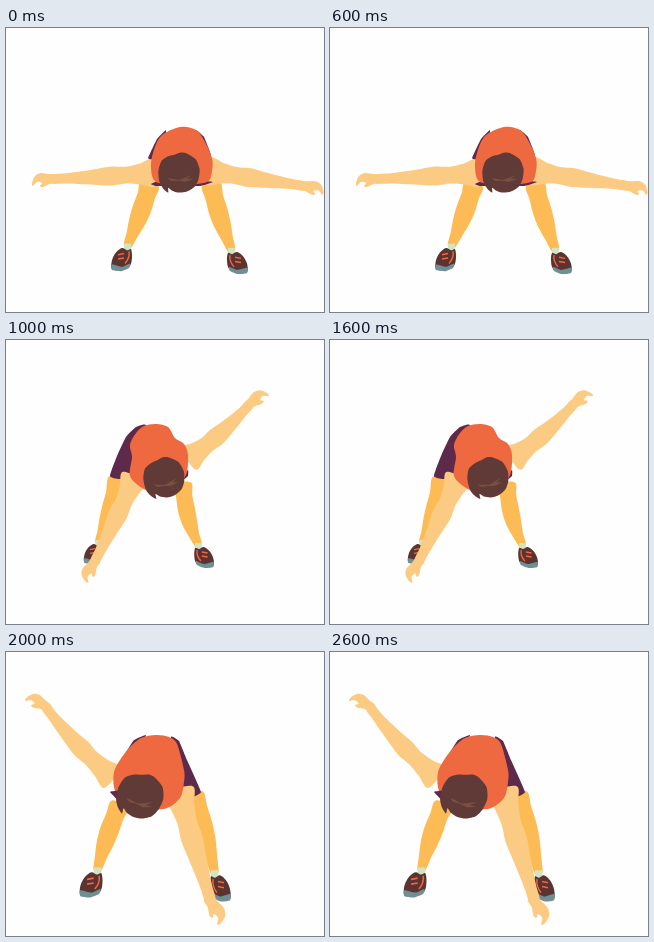
These frames come from a looping animation (318 px wide and 284 px high, 3000 ms). An HTML page with a canvas:

```html
<!DOCTYPE html>
<html lang="en">
<head>
<meta charset="utf-8">
<title>Windmill toe touch</title>
<style>
  html, body { margin: 0; width: 100%; height: 100%; overflow: hidden; background: #fefefe; }
  canvas { display: block; width: 318px; height: 284px; }
</style>
</head>
<body>
<canvas id="stage" width="318" height="284"></canvas>
<script>
const ctx = document.getElementById('stage').getContext('2d');
const POSE_MS = 1000;
const SKIN = '#fbcb83', LEG = '#fdbb55', SHIRT = '#ee6940', SHORTS = '#5d2a4c',
      HAIR = '#5f3a36', STREAK = '#785040', SHOE = '#5b3331', SOLE = '#6e8f93', SOCK = '#d3e5c0';

// Half widths from the body outwards, evenly spaced along the limb.
const ARM_SHAPE = [13, 10.5, 8.5, 9.5, 8, 6.5, 5.2, 4.2];
const LEG_SHAPE = [9, 9, 9.5, 8.5, 6, 3.5];

const parse = text => text.split(' ').map(p => p.split(',').map(Number));

// Closed curve through every point; a low tension keeps corners sharp.
function blob(color, pts, tension = 0.15) {
  if (typeof pts === 'string') pts = parse(pts);
  const n = pts.length, at = i => pts[(i + n) % n];
  ctx.beginPath();
  ctx.moveTo(...pts[0]);
  for (let i = 0; i < n; i++) {
    const [a, b, c, d] = [at(i - 1), at(i), at(i + 1), at(i + 2)];
    ctx.bezierCurveTo(
      b[0] + (c[0] - a[0]) * tension, b[1] + (c[1] - a[1]) * tension,
      c[0] - (d[0] - b[0]) * tension, c[1] - (d[1] - b[1]) * tension, c[0], c[1]);
  }
  ctx.fillStyle = color;
  ctx.fill();
}

function placed(x, y, angle, sx, sy, paint) {
  ctx.save();
  ctx.translate(x, y);
  ctx.rotate(angle);
  ctx.scale(sx, sy);
  paint();
  ctx.restore();
}

// Tapered limb around a quadratic curve from a to c, bent towards b.
function limb(color, shape, path, size) {
  const [a, b, c] = parse(path);
  const left = [], right = [];
  shape.forEach((half, i) => {
    const t = i / (shape.length - 1), u = 1 - t;
    const [x, y] = [0, 1].map(k => u * u * a[k] + 2 * u * t * b[k] + t * t * c[k]);
    const [dx, dy] = [0, 1].map(k => u * (b[k] - a[k]) + t * (c[k] - b[k]));
    const r = half * size / Math.hypot(dx, dy);
    left.push([x + dy * r, y - dx * r]);
    right.unshift([x - dy * r, y + dx * r]);
  });
  blob(color, [...left, ...right]);
  return c;
}

function arm(path, handAngle, side, size = 1) {
  const [x, y] = limb(SKIN, ARM_SHAPE, path, size);
  placed(x, y, handAngle, size, side * size, () =>
    blob(SKIN, '-5,-4 3,-5 11,-6 17,-3 20,4 19,7 15,3 10,4 12,7 9,8 2,5 -5,4'));
}

function leg(path, size, shoeX, shoeY) {
  const [x, y] = limb(LEG, LEG_SHAPE, path, size);
  placed(x, y, 0, shoeX, shoeY, () => {
    ctx.fillStyle = SOCK;
    ctx.fillRect(-4, -3, 7, 6);
    blob(SHOE, '-4,2 0,3 5,1 11,5 15,12 15,20 6,21 -3,17 -5,9');
    blob(SOLE, '-3,15 5,18 15,16 15,21 6,22 -2,19', 0.1);
    ctx.strokeStyle = SHIRT;
    ctx.lineWidth = 1.4;
    ctx.beginPath();
    ctx.moveTo(-2, 4);
    ctx.quadraticCurveTo(-3, 10, 2, 15);
    for (const lace of [6, 10]) {
      ctx.moveTo(3, lace);
      ctx.lineTo(9, lace + 1);
    }
    ctx.stroke();
  });
}

function head(x, y, angle, size) {
  placed(x, y, angle, size, size, () => {
    blob(HAIR, '-4,-19 2,-21 8,-20 17,-14 21,-4 20,6 16,14 8,19 0,20 -7,18 -11,15 -11,20 -16,16 -20,9 -21,-2 -18,-12 -11,-17', 0.12);
    blob(STREAK, '-11,5 0,7 13,2 8,6 14,6 6,9 -1,8 -8,8', 0.05);
  });
}

function reachOut() {
  leg('144,156 135,186 121,219', 1, -1, 1.1);
  leg('205,156 213,190 226,223', 1, 1, 1.05);
  arm('148,145 100,149 46,151', Math.PI, -1);
  arm('202,143 250,151 298,158', 0.1, 1);
  blob(SHORTS, '160,102 151,111 142,130 147,131 158,115', 0.05);
  blob(SHORTS, '190,102 198,109 205,127 202,131 190,115', 0.05);
  blob(SHORTS, '145,156 153,153 198,153 207,154 194,158 151,158', 0.05);
  blob(SHIRT, '174,99 190,102 198,112 206,130 206,143 201,154 175,157 150,154 145,140 147,125 155,108');
  head(173, 145, 0, 0.98);
}

function touchLeft() {
  leg('111,138 104,178 92,203', 0.9, -0.9, 0.95);
  leg('177,143 179,178 193,206', 0.9, 0.95, 1);
  arm('182,119 216,95 244,64', -0.75, 1);
  blob(SHORTS, '140,85 130,87 120,97 111,116 104,136 113,139 125,138 140,110', 0.08);
  arm('129,137 110,180 88,223', 2.2, -1);
  blob(SHORTS, '174,136 182,130 182,136 177,140', 0.05);
  blob(SHIRT, '138,86 150,84 162,87 169,98 178,104 182,115 180,135 168,148 150,152 136,148 124,136 126,117 124,105 130,93');
  head(158, 138, -0.15, 0.98);
}

function touchRight() {
  leg('114,152 100,184 91,219', 1, -1.1, 1.2);
  leg('188,142 200,180 209,222', 1, 1, 1.25);
  arm('107,126 68,93 39,54', Math.PI + 0.6, -1);
  blob(SHORTS, '165,85 173,89 181,108 195,140 185,145 170,130', 0.05);
  blob(SHORTS, '140,83 128,88 120,101 130,105', 0.05);
  arm('172,138 188,195 205,250', 0.95, 1, 1.15);
  blob(SHIRT, '150,83 163,85 171,92 178,118 178,130 174,146 158,157 130,155 114,148 108,135 108,120 114,108 123,96 135,86');
  blob(SHORTS, '104,140 114,139 116,152', 0.05);
  head(134, 144, 0.3, 1.1);
}

const poses = [reachOut, touchLeft, touchRight];
const start = performance.now();

function draw() {
  const elapsed = performance.now() - start;
  ctx.fillStyle = '#fefefe';
  ctx.fillRect(0, 0, 318, 284);
  poses[Math.floor(elapsed / POSE_MS) % poses.length]();
  requestAnimationFrame(draw);
}
draw();
</script>
</body>
</html>
```
